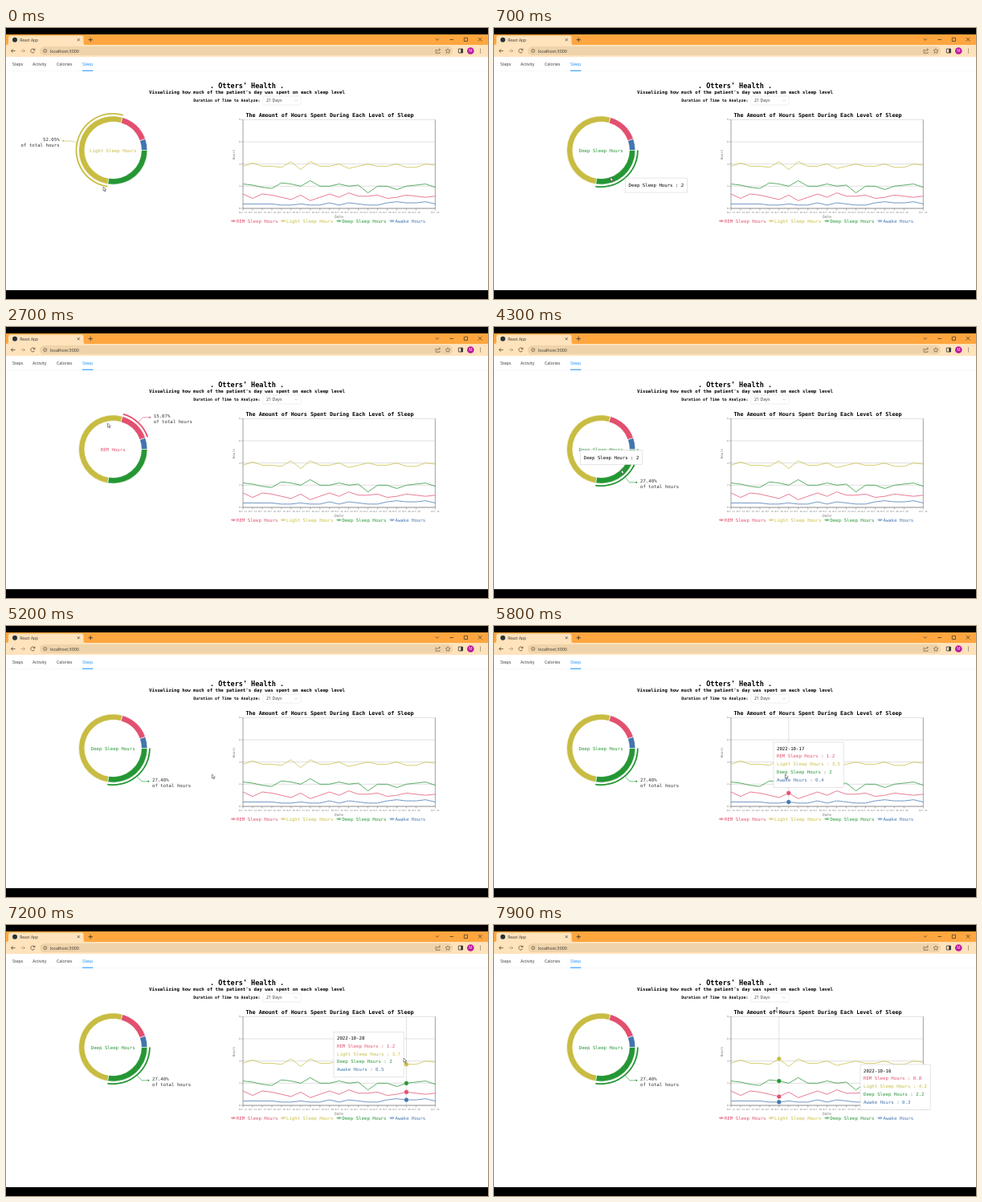
Recreate the animation shown at these times as an HTML page. Size 600x338 px, loop 8000 ms.

```html
<!DOCTYPE html>
<html lang="en">
<head>
<meta charset="utf-8">
<title>Sleep dashboard</title>
<style>
  html, body { margin: 0; width: 100%; height: 100%; overflow: hidden; background: #fff; }
  svg { display: block; width: 100vw; height: 100vh; }
  text { font: 5.71px "DejaVu Sans Mono", monospace; white-space: pre; }
  .ui { font-family: "Open Sans", sans-serif; }
</style>
</head>
<body>
<svg id="stage" viewBox="0 0 600 338"></svg>
<script>
const LOOP = 8000, STEP = 100, CHAR = 3.44;
const RED = '#e2506f', YELLOW = '#c8bc42', GREEN = '#259634', BLUE = '#4275af';

const series = [
  { name: 'REM Sleep Hours', color: RED, legendX: 280,
    values: [1.3, .9, 1.3, 1.2, 1, .8, 1.2, .7, 1, 1.3, 1, 1.4, 1.1, 1.1, 1.2, .9, 1, 1.2, 1.1, 1, 1.1] },
  { name: 'Light Sleep Hours', color: YELLOW, legendX: 342,
    values: [3.8, 4.1, 3.8, 3.8, 3.7, 4.2, 3.5, 4.2, 3.8, 3.8, 4, 3.6, 3.8, 4, 3.8, 3.8, 4, 3.7, 3.7, 4, 3.9] },
  { name: 'Deep Sleep Hours', color: GREEN, legendX: 411.5,
    values: [2.2, 2.1, 1.9, 1.8, 2.3, 2.2, 2, 2.5, 2, 2, 2.2, 2, 2.1, 1.4, 2, 2, 1.7, 2, 2.1, 2.2, 1.9] },
  { name: 'Awake Hours', color: BLUE, legendX: 477.5,
    values: [.4, .4, .4, .4, .3, .3, .4, .3, .3, .5, .3, .5, .4, .3, .3, .5, .6, .5, .5, .6, .4] }
];

const slices = [
  { name: 'Awake Hours', value: .4, color: BLUE },
  { name: 'REM Hours', value: 1.1, color: RED },
  { name: 'Light Sleep Hours', value: 3.8, color: YELLOW },
  { name: 'Deep Sleep Hours', value: 2, color: GREEN }
];
const LIGHT = 2;

// Pointer path and chart tooltip path: time, x, y
const pointerKeys = [
  [0, 121, 198], [300, 132, 194], [700, 145, 186], [1100, 165, 175], [1500, 170, 150],
  [2000, 160, 125], [2400, 150, 120], [2700, 126.5, 120], [3200, 100, 130], [3700, 98, 165],
  [4200, 112, 187], [4300, 158.5, 178], [4700, 165, 172], [5400, 293, 190], [5650, 362, 187],
  [5800, 362.5, 185], [6100, 405, 187], [6500, 462, 189], [7000, 500, 172], [7400, 490, 160],
  [7700, 452, 168], [7800, 354, 118], [7900, 352, 106]
];
const tooltipKeys = [
  [5500, 312, 180], [5800, 348, 145], [6000, 372, 126], [6300, 372, 125], [6500, 384, 125],
  [6700, 408, 122], [7500, 408, 140], [7700, 450, 172], [7800, 456, 174], [7900, 456, 174]
];

function at(keys, t) {
  const i = keys.findIndex(k => k[0] >= t);
  if (i < 0) return keys[keys.length - 1].slice(1);
  if (i === 0) return keys[0].slice(1);
  const [a, b] = [keys[i - 1], keys[i]], f = (t - a[0]) / (b[0] - a[0]);
  return [a[1] + (b[1] - a[1]) * f, a[2] + (b[2] - a[2]) * f];
}

// Markup helpers
const rect = (x, y, w, h, fill, more = '') => `<rect x="${x}" y="${y}" width="${w}" height="${h}" fill="${fill}" ${more}/>`;
const circle = (x, y, r, fill, more = '') => `<circle cx="${x}" cy="${y}" r="${r}" fill="${fill}" ${more}/>`;
const stroke = (d, color, w = .7, more = '') => `<path d="${d}" fill="none" stroke="${color}" stroke-width="${w}" ${more}/>`;
const text = (s, x, y, fill = '#111', style = '', more = '') => `<text x="${x}" y="${y}" fill="${fill}" style="${style}" ${more}>${s}</text>`;
const ui = (s, x, y, size, fill = '#333') => text(s, x, y, fill, `font-size:${size}px`, 'class="ui"');
const MID = 'text-anchor="middle"';
const heading = (s, x, y, size) => text(s, x, y, '#000', `font-size:${size}px;font-weight:bold`, MID);

// Donut geometry
const CX = 133.2, CY = 152.5, INNER = 35.4, OUTER = 42.7;
const total = slices.reduce((sum, s) => sum + s.value, 0);
let angle = 0;
for (const s of slices) {
  s.from = angle;
  s.to = angle += s.value / total * 360;
  s.mid = (s.from + s.to) / 2;
}
const polar = (r, deg) => [CX + r * Math.cos(deg * Math.PI / 180), CY - r * Math.sin(deg * Math.PI / 180)];
function sector(s, r0, r1, more = '') {
  const big = +(s.to - s.from > 180);
  return `<path d="M${polar(r1, s.from)}A${r1} ${r1} 0 ${big} 0 ${polar(r1, s.to)}L${polar(r0, s.to)}A${r0} ${r0} 0 ${big} 1 ${polar(r0, s.from)}Z" fill="${s.color}" ${more}/>`;
}

// Line chart geometry
const LEFT = 295, RIGHT = 534.3, TOP = 114.3, BOTTOM = 225, GAP = (RIGHT - LEFT) / 20;
const px = i => LEFT + i * GAP;
const py = v => BOTTOM - v * (BOTTOM - TOP) / 8;

function browser() {
  const ink = '#5b4a35';
  return rect(0, 0, 600, 338, '#fff') + rect(0, 0, 600, 8, '#000') + rect(0, 327, 600, 11, '#000') +
    rect(0, 8, 600, 13, '#ffa63f') +
    `<path d="M1 21.2Q3 21 3 18.5V12Q3 9.5 5.5 9.5H94Q96.500 9.5 96.500 12V18.5Q96.500 21 98.500 21.2Z" fill="#ffe3bc"/>` +
    rect(0, 21, 600, 15, '#ffe3bc') +
    circle(11, 14.7, 3, '#263238') + ui('React App', 17.2, 16.7, 4.9) +
    stroke('M88.800 13.200l3 3m0-3l-3 3', '#333') + stroke('M102.500 14.700h5.400m-2.700-2.700v5.400', '#333', .8) +
    stroke('M534.800 13.300l2 2 2-2M552.500 14.500h4.500M570.300 12.300h4.200v4.200h-4.200zM587.800 12l4.600 4.600m0-4.600l-4.600 4.600', '#333') +
    stroke('M11.500 28.500h-5m2.200-2.300l-2.300 2.300 2.300 2.300', ink, .8) +
    stroke('M18.500 28.500h5m-2.200-2.300l2.300 2.300-2.300 2.300', '#b39c7b', .8) +
    stroke('M35.500 27.200a2.500 2.500 0 1 0 .1 2.300M35.900 25.600v2h-2', ink, .8) +
    rect(42, 23, 514, 11, '#efd3aa', 'rx="5.5"') +
    circle(48.700, 28.500, 2.100, 'none', `stroke="${ink}" stroke-width=".6"`) +
    stroke('M48.700 28.200v1.500m0-2.600v.5', ink, .6) + ui('localhost:3000', 55, 30.500, 5.3) +
    stroke('M536.500 27.300h-1.500v4h5v-1.500M536.800 29.500q.3-2.600 3.400-2.600m-1.200-1.300l1.500 1.300-1.500 1.300', ink, .6) +
    stroke('M550 25.700l.9 1.900 2.100.2-1.600 1.400.5 2.100-1.900-1.100-1.900 1.100.5-2.100-1.600-1.400 2.100-.2z', ink, .55) +
    stroke('M563.300 26h5.200v5h-5.200z', '#333', .8) + rect(566.2, 26, 2.300, 5, '#333') +
    circle(578.300, 28.500, 4.300, '#b8169c') +
    text('M', 578.300, 30.300, '#fff', 'font-size:4.8px', MID + ' class="ui"') +
    [26.300, 28.500, 30.700].map(y => circle(590.500, y, .55, '#333')).join('');
}

function page() {
  const nav = [['Steps', 8], ['Activity', 33], ['Calories', 63], ['Sleep', 95]];
  return nav.map(([s, x]) => ui(s, x, 47.200, 5.2, s === 'Sleep' ? '#1890ff' : '#333')).join('') +
    rect(0, 53.200, 600, .5, '#f0f0f0') + rect(95, 52.700, 13.300, 1, '#1890ff') +
    heading(". Otters' Health .", 300, 75, 8.5) +
    heading("Visualizing how much of the patient's day was spent on each sleep level", 300, 82.200, 5.71) +
    heading('Duration of Time to Analyze:', 274.800, 91.700, 4.95) +
    rect(320, 85, 47, 11, '#fff', 'stroke="#dedede" stroke-width=".5" rx=".8"') +
    ui('21 Days', 324, 92.400, 5.3) + stroke('M359.300 89.500l1.800 1.900 1.800-1.900', '#bbb', .6);
}

function chart() {
  let out = heading('The Amount of Hours Spent During Each Level of Sleep', 403, 110.800, 6.68);
  for (let v = 0; v <= 8; v += 2) {
    out += stroke(`M${LEFT} ${py(v)}H${RIGHT}`, '#ccc', .6) + stroke(`M${LEFT - 2.500} ${py(v)}h2.500`, '#777', .5) +
      text(v, 291.800, py(v) + 1.100, '#777', 'font-size:3px', 'text-anchor="end"');
  }
  out += stroke(`M${RIGHT} ${TOP}V${BOTTOM}`, '#777', .7) + stroke(`M${LEFT} ${TOP}V${BOTTOM}H${RIGHT}`, '#777', .7);
  for (let i = 0; i <= 20; i++) {
    if (i === 19) continue;
    out += stroke(`M${px(i)} ${BOTTOM}v2.500`, '#777', .5) +
      text('Oct ' + (11 + i), px(i), 231.300, '#777', 'font-size:2.9px', MID);
  }
  out += text('Hours', 0, 0, '#777', 'font-size:4.2px', MID + ' transform="translate(285.300 158)rotate(-90)"') +
    text('Date', 414.500, 237.300, '#777', 'font-size:4.6px', MID);
  for (const s of series) {
    out += stroke('M' + s.values.map((v, i) => px(i) + ' ' + py(v)).join('L'), s.color, .75) +
      stroke(`M${s.legendX} 240.700h6`, s.color, .8) +
      circle(s.legendX + 3, 240.700, 1.100, '#fff', `stroke="${s.color}" stroke-width=".8"`) +
      text(s.name, s.legendX + 7, 242.700, s.color);
  }
  return out;
}

function donut(active) {
  const s = slices[active], right = Math.cos(s.mid * Math.PI / 180) >= 0, dir = right ? 1 : -1;
  const [mx, my] = polar(54.5, s.mid), ex = mx + dir * 8.600;
  const anchor = `text-anchor="${right ? 'start' : 'end'}"`;
  return slices.map(p => sector(p, INNER, OUTER, 'stroke="#fff" stroke-width=".6"')).join('') +
    sector(s, 44.8, 46.6) +
    text(s.name, CX, 155.300, s.color, '', MID) +
    stroke(`M${polar(46, s.mid)}L${mx} ${my}H${ex}`, s.color, .6) + circle(ex, my, 1, s.color) +
    text((s.value / total * 100).toFixed(2) + '%', ex + dir * 4.700, my, '#333', '', anchor) +
    text('of total hours', ex + dir * 4.700, my + 7.200, '#333', '', anchor);
}

function tooltip([x, y], lines, h, firstY) {
  const w = Math.max(...lines.map(l => l[0].length)) * CHAR + 8;
  return rect(x, y, w, h, '#fff', 'stroke="#ccc" stroke-width=".5"') +
    lines.map(([s, color], i) => text(s, x + 4, y + firstY + i * 9.900, color)).join('');
}

function chartHover(t) {
  const x = at(pointerKeys, t - STEP)[0];
  const i = Math.max(0, Math.min(20, Math.round((x - LEFT) / GAP)));
  const lines = [['2022-10-' + (11 + i), '#000'], ...series.map(s => [`${s.name} : ${s.values[i]}`, s.color])];
  return stroke(`M${px(i)} ${TOP}V${BOTTOM}`, '#ccc', .6) +
    series.map(s => circle(px(i), py(s.values[i]), 2.800, s.color, 'stroke="#fff" stroke-width=".4"')).join('') +
    tooltip(at(tooltipKeys, t), lines, 56.500, 9.500);
}

function pointer(t) {
  const [x, y] = at(pointerKeys, t);
  if (t >= 7900) return stroke(`M${x - 1.200} ${y - 2.800}h2.400m-1.200 0v5.600m-1.200 0h2.400`, '#222', .6);
  return `<path transform="translate(${x} ${y})" d="M0 0V5.200L1.200 4.100 2.100 6.100 3 5.700 2.100 3.800H3.800Z" fill="#fff" stroke="#222" stroke-width=".5"/>`;
}

// Hover state per step: the last slice touched stays active, its tooltip eases over
const EASE = [.12, .55, .85, .96];
const rest = i => polar(39, slices[i].mid).map(v => v + 5);
const states = [];
{
  let active = LIGHT, from = rest(LIGHT), age = EASE.length, box = from;
  for (let t = 0; t < LOOP; t += STEP) {
    const [x, y] = at(pointerKeys, t), r = Math.hypot(x - CX, y - CY);
    const deg = (Math.atan2(CY - y, x - CX) * 180 / Math.PI + 360) % 360;
    const inside = r > 34 && r < OUTER;
    const hit = slices.findIndex(s => deg >= s.from && deg < s.to);
    if (inside && hit >= 0 && hit !== active) { active = hit; from = box; age = 0; }
    const f = EASE[age++] ?? 1;
    box = rest(active).map((v, k) => from[k] + (v - from[k]) * f);
    states.push({ active, inside, box });
  }
}

const stage = document.getElementById('stage');
stage.innerHTML = browser() + page() + chart() + '<g id="live"></g>';
const live = document.getElementById('live');
let shown = -1;

function render(now) {
  const step = Math.floor(now % LOOP / STEP);
  if (step !== shown) {
    shown = step;
    const t = step * STEP, { active, inside, box } = states[step], s = slices[active];
    live.innerHTML = donut(active) +
      (inside ? tooltip(box, [[`${s.name} : ${s.value}`, '#000']], 18, 10.800) : '') +
      (t >= 5500 ? chartHover(t) : '') + pointer(t);
  }
  requestAnimationFrame(render);
}
render(0);
</script>
</body>
</html>
```
